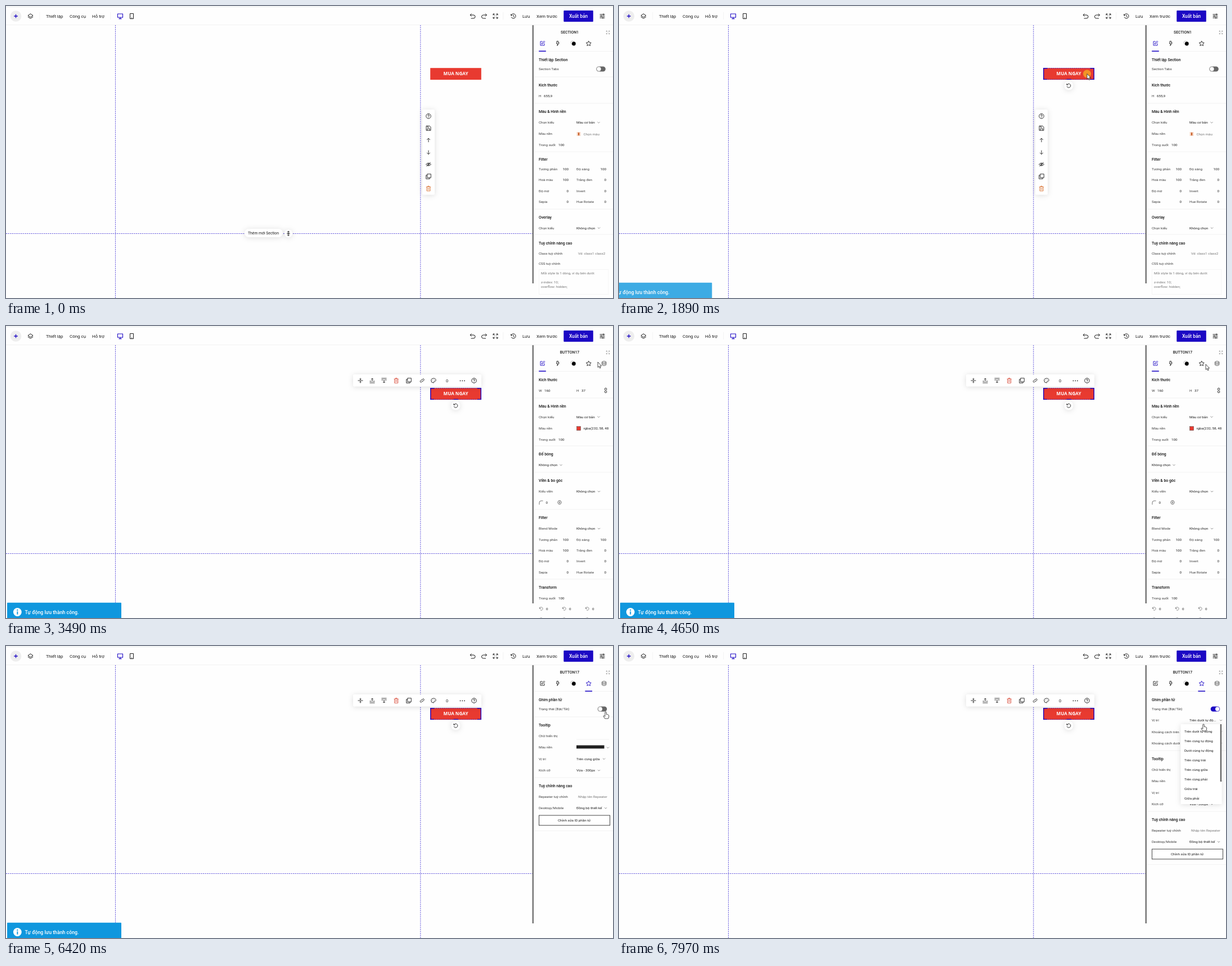
Animation, 1079 px wide and 519 px high, one loop 8000 ms. Source, as an HTML page:

```html
<!DOCTYPE html>
<html lang="vi">
<head>
<meta charset="utf-8">
<title>Page editor</title>
<style>
  html, body { margin: 0; width: 100%; height: 100%; overflow: hidden; background: #fefefe; }
  svg { display: block; width: 1079px; height: 519px; font-family: Roboto, sans-serif; }
  text { white-space: pre; }
  .float { filter: drop-shadow(0 1px 5px rgba(0, 0, 0, .13)); }
</style>
</head>
<body>
<svg id="stage" viewBox="0 0 1079 519"></svg>
<script>
const BLUE = '#1c08c4', INK = '#1c1c1c', LABEL = '#3c3c3c', HINT = '#777';

// Markup helpers; text is placed by the middle of its capitals.
const text = (x, y, s, { size = 6.25, fill = LABEL, weight = 400, anchor = 'start', font = '' } = {}) =>
  `<text x="${x}" y="${y + size * .355}" font-size="${size}" fill="${fill}" font-weight="${weight}" text-anchor="${anchor}"${font && ` font-family="${font}"`}>${s.replace(/&/g, '&amp;')}</text>`;
const rect = (x, y, w, h, fill, extra = '') =>
  `<rect x="${x}" y="${y}" width="${w}" height="${h}" fill="${fill}" ${extra}/>`;
const circle = (x, y, r, fill, extra = '') => `<circle cx="${x}" cy="${y}" r="${r}" fill="${fill}" ${extra}/>`;
const line = (d, color, width = 1, extra = '') =>
  `<path d="${d}" fill="none" stroke="${color}" stroke-width="${width}" ${extra}/>`;
const group = (id, ...parts) => `<g id="${id}">${parts.join('')}</g>`;

const ICONS = {
  plus: 'M0-3.3V3.3M-3.3 0H3.3',
  layers: 'M0-4.2L4.5-1 0 2-4.5-1ZM-4.5 1.2L0 4.3 4.5 1.2',
  desktop: 'M-4.5-4h9v6.3h-9zM0 2.3v2.3M-2.5 4.6h5',
  phone: 'M-3-4.6h6v9.2h-6zM-.8 3h1.6',
  undo: 'M-2-4.5L-4.5-2-2 .5M-4.5-2H1.5A3 3 0 0 1 1.5 4H-3',
  redo: 'M2-4.5L4.5-2 2 .5M4.5-2H-1.5A3 3 0 0 0-1.5 4H3',
  expand: 'M-4-1.5V-4H-1.5M1.5-4H4V-1.5M4 1.5V4H1.5M-1.5 4H-4V1.5M-4-4L-1.2-1.2M4-4L1.2-1.2M4 4L1.2 1.2M-4 4L-1.2 1.2',
  history: 'M-4-1.2A4.1 4.1 0 1 1-3.8 1.6M-4.3-3.6V-1.2H-2M0-2.3V.3L1.8 1.3',
  sliders: 'M-4.5-3H4.5M-4.5 0H4.5M-4.5 3H4.5M2-4.4v2.8M-2-1.4v2.8M1 1.6v2.8',
  help: 'M4.3 0A4.3 4.3 0 1 1-4.3 0 4.3 4.3 0 1 1 4.3 0M-1.4-1A1.4 1.4 0 1 1 0 .5V1.1M0 2.1v.9',
  save: 'M-4-4H2L4-2V4H-4ZM-2 4V.8H2V4M-2-4v2.2h3',
  up: 'M0 3.5V-3.5M-2.8-.7L0-3.5 2.8-.7',
  down: 'M0-3.5V3.5M-2.8 .7L0 3.5 2.8 .7',
  hide: 'M-4.5 0Q0-5 4.5 0 0 5-4.5 0ZM-1.4 0A1.4 1.4 0 1 1 1.4 0 1.4 1.4 0 1 1-1.4 0M-3.5 3.5L3.8-3.6',
  copy: 'M-2.2-4.3h6.5v6.5h-6.5zM-2.2-2.2H-4.3V4.3H2.2V2.2',
  trash: 'M-4-2.8h8M-3-2.8V4.3H3V-2.8M-1.3-2.8V-4.3h2.6v1.5M-1-.8v3M1-.8v3',
  middle: 'M-4.5 0h9M0-4.5v3M-1.4-2.8L0-1.5 1.4-2.8M0 4.5v-3M-1.4 2.8L0 1.5 1.4 2.8',
  above: 'M-4.5 4h9M-4.5 1.2h3M1.5 1.2h3M0 1.8V-4M-1.8-2.2L0-4 1.8-2.2',
  below: 'M-4.5-4h9M-4.5-1.2h3M1.5-1.2h3M0-1.8V4M-1.8 2.2L0 4 1.8 2.2',
  link: 'M-.6 2.4L-1.4 3.2A1.8 1.8 0 0 1-3.4 .8L-1.2-1.2A1.8 1.8 0 0 1 1.2-1M.6-2.4L1.4-3.2A1.8 1.8 0 0 1 3.4-.8L1.2 1.2A1.8 1.8 0 0 1-1.2 1',
  palette: 'M0 4A4.3 4 0 1 1 4.3-.5Q4 1.5 1.5 1.2 0 1.5 .8 2.8 1 4 0 4M-2.4-.3v.5M-1-2.2v.5M1.5-2v.5',
  edit: 'M0-3.5H-3.5V3.5H3.5V0M-1.3 1.3L-.9-.7 3-4.2 4.2-3 .6 .9Z',
  bolt: 'M.8-4H-1.8L-2.4 .4H-.4L-1 4.2 2.5-1.2H.3Z',
  star: 'M0-4.4L1.4-1.5 4.5-1.1 2.2 1 2.8 4.1 0 2.6-2.8 4.1-2.2 1-4.5-1.1-1.4-1.5Z',
  data: 'M-3.6-2.4A3.6 1.4 0 0 1 3.6-2.4 3.6 1.4 0 0 1-3.6-2.4V2.4A3.6 1.4 0 0 0 3.6 2.4V-2.4M-3.6 0A3.6 1.4 0 0 0 3.6 0',
  chain: 'M-1.7-.8V-2.8A1.7 1.4 0 0 1 1.7-2.8V-.8M-1.7 .8V2.8A1.7 1.4 0 0 0 1.7 2.8V.8M0-1.8V1.8',
  resize: 'M-2.8 0h5.6M0-4V4M-1.8-2.4L0-4.2 1.8-2.4M-1.8 2.4L0 4.2 1.8 2.4',
  rotate: 'M-3-1.6A3.4 3.4 0 1 1-3.3 1.2M-3.6-3.6V-1.3H-1.3',
  corner: 'M-3 3.5V0Q-3-3.2 0-3.2H3.5',
  gear: 'M-1.6-3.1H1.6L3.4 0 1.6 3.1H-1.6L-3.4 0ZM-1 0A1 1 0 1 1 1 0 1 1 0 1 1-1 0',
  spin: 'M-2.6-2.6V0H0M-2.4-.6A2.8 2.8 0 1 1-1 2.5',
  chevron: 'M-2.1-1L0 1.1 2.1-1'
};
const icon = (name, x, y, color = INK, width = .9, scale = 1) =>
  `<path transform="translate(${x} ${y}) scale(${scale})" d="${ICONS[name]}" fill="none" stroke="${color}" stroke-width="${width}" stroke-linejoin="round"/>`;

// Settings panel pieces
const label = (y, s, x = 947) => text(x, y, s);
const value = (x, y, s) => text(x, y, s, { fill: INK });
const hint = (y, s, x = 1017) => text(x, y, s, { fill: HINT });
const head = (y, s) => text(947, y, s, { size: 6.85, fill: '#111', weight: 500 });
const rule = y => rect(938, y, 141, 1, '#f3f3f3');
const chevron = (x, y) => icon('chevron', x, y, '#666', .7);
const select = (y, s, arrow, x = 1014) => value(x, y, s) + chevron(arrow, y);
const title = s => text(1002, 47, s, { size: 6.85, fill: INK, weight: 500, anchor: 'middle' });
const toggle = (x, y, on) => rect(x, y - 4.6, 16.5, 9.2, on ? BLUE : '#666', 'rx="4.6"') +
  circle(x + (on ? 12 : 4.6), y, 3.7, '#fff');
const filters = y => [
  ['Tương phản', 100, 'Độ sáng', 100], ['Hoà màu', 100, 'Trắng đen', 0],
  ['Độ mờ', 0, 'Invert', 0], ['Sepia', 0, 'Hue Rotate', 0]
].map(([a, m, b, n], i) => {
  const row = y + i * 19.25, end = { fill: INK, anchor: 'end' };
  return label(row, a) + text(1000, row, `${m}`, end) + label(row, b, 1014) + text(1067, row, `${n}`, end);
}).join('');
const transforms = y => [951, 992, 1033].map(x => icon('spin', x, y, '#666', .7) + value(x + 9, y, '0')).join('');
const tabs = (active, data) => ['edit', 'bolt', 'contrast', 'star', 'data'].map((name, i) => {
  const x = 953.5 + i * 27.4, color = name === active ? BLUE : INK;
  const underline = name === active ? rect(x - 6.3, 79.5, 12.6, 1.6, BLUE) : '';
  if (name === 'contrast') return circle(x - 1.2, 65.2, 3.1, '#fff', 'stroke="#999" stroke-width=".6"') + circle(x + 1, 67, 3.4, '#000');
  return name === 'data' && !data ? '' : icon(name, x, 66.5, color, name === 'data' ? .7 : .9) + underline;
}).join('');

const sectionPanel = group('sectionPanel', title('SECTION1'), tabs('edit', false),
  head(96, 'Thiết lập Section'), label(112, 'Section Tabs'), toggle(1049.3, 112, false), rule(125.5),
  head(141, 'Kích thước'), label(160, 'H'), value(956, 160, '655,9'), rule(172.5),
  head(188, 'Màu & Hình nền'), label(207, 'Chọn kiểu'), select(207, 'Màu cơ bản', 1053.5),
  label(227, 'Màu nền'), rect(1014.5, 224, 7, 7, '#f7d9c8'), rect(1016.8, 225, 2.4, 5, '#c8622c'), hint(227.5, 'Chọn màu', 1026.5),
  label(247, 'Trong suốt'), value(982, 247, '100'), rule(258.5),
  head(273, 'Filter'), filters(290), rule(360.5),
  head(376, 'Overlay'), label(394.5, 'Chọn kiểu'), select(394.5, 'Không chọn', 1054), rule(405.5),
  head(421.5, 'Tuỳ chỉnh nâng cao'), label(440, 'Class tuỳ chỉnh'), hint(440, 'Vd: class1 class2'),
  label(457.5, 'CSS tuỳ chỉnh'), rect(947.5, 468.5, 123.5, 44, 'none', 'stroke="#f5f5f5"'),
  hint(474.5, 'Mỗi style là 1 dòng, ví dụ bên dưới:', 951), hint(490.5, 'z-index: 10;', 951), hint(498.5, 'overflow: hidden;', 951));

const buttonPanel = group('buttonPanel', title('BUTTON17'), tabs('edit', true),
  head(96, 'Kích thước'), label(115, 'W'), value(957, 115, '160'), label(115, 'H', 1014), value(1023, 115, '37'),
  icon('chain', 1066, 114.5), rule(127.5),
  head(142.5, 'Màu & Hình nền'), label(161.5, 'Chọn kiểu'), select(161.5, 'Màu cơ bản', 1053.5),
  label(182, 'Màu nền'), rect(1014.5, 178.5, 7, 7, '#e83a30', 'stroke="#555" stroke-width=".6"'), value(1026.5, 182, 'rgba(232, 58, 48'),
  label(201.5, 'Trong suốt'), value(982, 201.5, '100'), rule(212.5),
  head(228, 'Đổ bóng'), select(247, 'Không chọn', 986.5, 947), rule(259.5),
  head(275, 'Viền & bo góc'), label(294, 'Kiểu viền'), select(294, 'Không chọn', 1054),
  icon('corner', 951, 314, '#555', .8), value(959.5, 314, '0'), icon('gear', 984, 313.5, '#444', .8), rule(325.5),
  head(341, 'Filter'), label(360, 'Blend Mode'), select(360, 'Không chọn', 1054), filters(379.7), rule(449.5),
  head(465, 'Transform'), label(484, 'Trong suốt'), value(982, 484, '100'), transforms(502.5), transforms(521.5));

const advancedRest = (id, dy) => `<g id="${id}" transform="translate(0 ${dy})">` + [
  rule(125.5), head(141, 'Tooltip'), label(160, 'Chữ hiển thị'), rect(1014, 165.5, 58, 1, '#f3f3f3'),
  label(180, 'Màu nền'), rect(1014, 176.5, 49.5, 5.8, '#222'), chevron(1070, 180.5),
  label(200.5, 'Vị trí'), select(200.5, 'Trên cùng giữa', 1063),
  label(221, 'Kích cỡ'), select(221, 'Vừa - 300px', 1054), rule(233.5),
  head(249, 'Tuỳ chỉnh nâng cao'), label(268, 'Repeater tuỳ chỉnh'), hint(268, 'Nhập tên Repeater'),
  label(288, 'Desktop/Mobile'), select(288, 'Đồng bộ thiết kế', 1066),
  rect(947.5, 301, 126, 17.8, '#fff', 'stroke="#333" stroke-width=".9"'),
  text(1010, 309.8, 'Chỉnh sửa ID phần tử', { fill: INK, anchor: 'middle' }), rule(328)].join('') + '</g>';

const advancedPanel = group('advancedPanel', title('BUTTON17'), tabs('star', true),
  head(96, 'Ghim phần tử'), label(112, 'Trạng thái (Bật/Tắt)'),
  group('unpinned', toggle(1051.7, 112, false), advancedRest('restHigh', 0)),
  group('pinned', toggle(1051.7, 112, true),
    label(132, 'Vị trí'), select(132, 'Trên dưới tự độ...', 1070),
    label(152.5, 'Khoảng cách trên'), value(1014, 152.5, '0'), chevron(1070, 152.5),
    label(173, 'Khoảng cách dưới'), value(1014, 173, '0'), chevron(1070, 173), advancedRest('restLow', 60)));

const options = ['Trên dưới tự động', 'Trên cùng tự động', 'Dưới cùng tự động', 'Trên cùng trái',
  'Trên cùng giữa', 'Trên cùng phải', 'Giữa trái', 'Giữa phải'];
const dropdown = group('dropdown', rect(998.5, 139, 73, 142, '#fff', 'class="float"'),
  ...options.map((s, i) => value(1005, 152 + i * 16.95, s)), rect(1068.7, 139, 2.4, 102, '#666'));

const topBar = group('topBar', rect(0, 0, 1079, 34, '#fefefe'), rect(0, 1, 1079, 1, '#e9eeee'), rect(0, 33.3, 1079, .8, '#eee'),
  circle(17.5, 18, 9.8, '#eee'), icon('plus', 17.5, 18, BLUE, 1.3), icon('layers', 43.5, 18, INK, 1),
  rect(59.5, 11, .7, 13, '#eee'), rect(185.5, 11, .7, 13, '#eee'), rect(883.5, 11, .7, 13, '#eee'),
  ...[[71, 'Thiết lập'], [113, 'Công cụ'], [153, 'Hỗ trợ'], [918, 'Lưu'], [943, 'Xem trước']]
    .map(([x, s]) => text(x, 18, s, { size: 7.95, fill: INK })),
  icon('desktop', 203, 18, BLUE, 1.1), icon('phone', 223.5, 18, INK, 1),
  icon('undo', 829.5, 18, INK, 1), icon('redo', 850, 18, INK, 1), icon('expand', 870, 18, INK, 1), icon('history', 902, 18, INK, 1),
  rect(991.3, 8, 52.5, 20, BLUE, 'rx="1"'),
  text(1017.5, 18, 'Xuất bản', { size: 8.4, fill: '#fff', weight: 500, anchor: 'middle' }), icon('sliders', 1060, 18, INK, 1.1));

const dashes = 'stroke-dasharray="1.7 1.7"';
const guides = line('M194.5 34V519M736.8 34V519M0 404.5H936', '#2b1ad0', .9, dashes);

const sectionTools = group('sectionTools', rect(740, 184, 22, 151.5, '#fff', 'rx="2" class="float"'),
  ...['help', 'save', 'up', 'down', 'hide', 'copy', 'trash'].map((name, i) =>
    icon(name, 751, 195.7 + i * 21.45, name === 'trash' ? '#d9702e' : INK)));

const addSection = group('addSection', rect(424, 396, 68, 15, '#fff', 'rx="7.5" class="float"'),
  text(457.5, 403.5, 'Thêm mới Section', { size: 6.8, fill: INK, anchor: 'middle' }),
  circle(502, 404.3, 7, '#fff', 'class="float"'), icon('resize', 502, 404.3, INK, 1));

const button = rect(754.2, 110.2, 90.6, 20.9, '#e83a30') +
  text(799.5, 120.5, 'MUA NGAY', { size: 8.1, fill: '#fff', weight: 700, anchor: 'middle', font: 'Open Sans, sans-serif' });
const hoverBox = group('hoverBox', line('M754.5 110.5H844.5V130.5H754.5Z', '#2b1ad0', .9, dashes));
const selection = group('selection',
  line('M761 110.8H754.8V130.4H761M838 110.8H844.3V130.4H838M795.5 130.4H803.5', BLUE, 1.4),
  circle(799.5, 141.5, 8, '#fff', 'class="float"'), icon('rotate', 799.5, 141.5));
const buttonTools = group('buttonTools', rect(617, 86, 228, 21.5, '#fff', 'rx="2" class="float"'),
  ...[['middle', 630], ['above', 651], ['below', 672], ['trash', 693.7], ['copy', 716], ['link', 739.7], ['palette', 760], ['help', 832]]
    .map(([name, x]) => icon(name, x, 97, name === 'trash' ? '#d84a38' : INK)),
  text(784, 97, '0', { size: 7.4, fill: INK, anchor: 'middle' }),
  ...[807.5, 811.3, 815].map(x => circle(x, 97.3, .9, INK)));

const toast = group('toast', rect(2, 491.7, 203, 30, '#0f97de', 'rx="1"'), circle(20.3, 508.5, 7.4, '#fff'),
  rect(19.4, 507.3, 1.9, 5.4, '#0f97de'), circle(20.3, 504.9, 1.15, '#0f97de'),
  text(33.5, 508.8, 'Tự động lưu thành công.', { size: 8.75, fill: '#fff', weight: 500 }));

const tooltip = group('tooltip', rect(1030, 40, 40, 17, '#2b2b2b', 'rx="1"'), '<path d="M1033 57h6l-3 3z" fill="#2b2b2b"/>',
  text(1049.5, 48.7, 'Nâng cao', { size: 6.8, fill: '#fff', anchor: 'middle' }));

const pointer = group('pointer', circle(0, 0, 7, '#f39a26', 'id="click" opacity=".92"'),
  '<g fill="#fff" stroke="#222" stroke-width=".8" stroke-linejoin="round">',
  '<path id="arrow" d="M0 0V9.5L2.2 7.6 3.6 11 5.2 10.3 3.8 7H6.6Z"/>',
  '<path id="hand" d="M-1.2 1.1Q0-.4 1.2 1.1V5Q2.2 4.2 3 5.4 4 4.8 4.6 6 5.6 5.8 5.6 7.2V9.5L4.6 12.5H-1.4L-4 8.6Q-4.2 7.2-2.8 7.4L-1.2 8.8Z"/>', '</g>');

const stage = document.getElementById('stage');
stage.innerHTML = rect(0, 0, 1079, 519, '#fefefe') + guides + button + hoverBox + selection + sectionTools + addSection +
  buttonTools + toast + rect(938, 34, 141, 485, '#fefefe') + rect(935.5, 34, 2.5, 459, '#757575') + rule(80) +
  icon('expand', 1070, 47, '#777', .8, .7) + sectionPanel + buttonPanel + advancedPanel + dropdown + topBar + tooltip + pointer;

const el = {};
stage.querySelectorAll('[id]').forEach(node => el[node.id] = node);

const LOOP = 8000;
// When each part is on screen: pairs of start and end
const shown = {
  sectionPanel: [[0, 2010]], buttonPanel: [[2010, 5560]], advancedPanel: [[5560, LOOP]],
  sectionTools: [[0, 2010]], addSection: [[0, 1750]], hoverBox: [[1150, LOOP]], selection: [[1750, LOOP]],
  buttonTools: [[2010, LOOP]], toast: [[1748, 6680]], tooltip: [[5000, 5700]],
  unpinned: [[0, 6890]], pinned: [[6890, LOOP]], dropdown: [[7580, LOOP]],
  pointer: [[330, LOOP]], hand: [[5150, 5720], [6300, 6980], [7100, LOOP]],
  click: [[1680, 2010], [5470, 5680], [6820, 6960], [7510, 7640]]
};
// Pointer stops: time, x, y
const path = [
  [330, 1061, 502], [1080, 839, 104], [1150, 839, 104], [1220, 832, 120.5],
  [2690, 832, 120.5], [3490, 1052, 64], [3700, 1052, 64], [3900, 1062, 66], [4150, 1038, 63], [4350, 1025, 64],
  [4510, 1040, 66], [4650, 1043, 68], [4800, 1054, 68], [5000, 1028, 68], [5150, 1037, 69], [5260, 1039, 68.6],
  [5700, 1039, 68.6], [6160, 1062, 110], [6420, 1066, 116.5], [6940, 1066, 116.5],
  [7160, 1047, 136.5], [7250, 1047, 136.5], [7370, 1045, 134], [7900, 1045, 134], [7970, 1039, 138.5]
];

const clamp = v => Math.min(1, Math.max(0, v));
const smooth = v => v * v * (3 - 2 * v);
function pointerAt(t) {
  const next = path.findIndex(stop => stop[0] > t);
  if (next === 0) return path[0].slice(1);
  if (next < 0) return path[path.length - 1].slice(1);
  const [t0, x0, y0] = path[next - 1], [t1, x1, y1] = path[next];
  const k = smooth((t - t0) / (t1 - t0));
  return [x0 + (x1 - x0) * k, y0 + (y1 - y0) * k];
}

function render(t) {
  const visible = id => shown[id].some(([from, to]) => t >= from && t < to);
  for (const id in shown) el[id].style.display = visible(id) ? '' : 'none';
  el.arrow.style.display = visible('hand') ? 'none' : '';

  const [x, y] = pointerAt(t);
  el.pointer.setAttribute('transform', `translate(${x} ${y})`);

  const arrive = 1 - (1 - clamp((t - 1748) / 340)) ** 3;
  el.toast.setAttribute('transform', `translate(${-204 * (1 - arrive)} 0)`);
  el.toast.setAttribute('opacity', arrive * (1 - clamp((t - 6430) / 250)));
}

const start = performance.now();
function tick() {
  render((performance.now() - start) % LOOP);
  requestAnimationFrame(tick);
}
tick();
</script>
</body>
</html>
```
